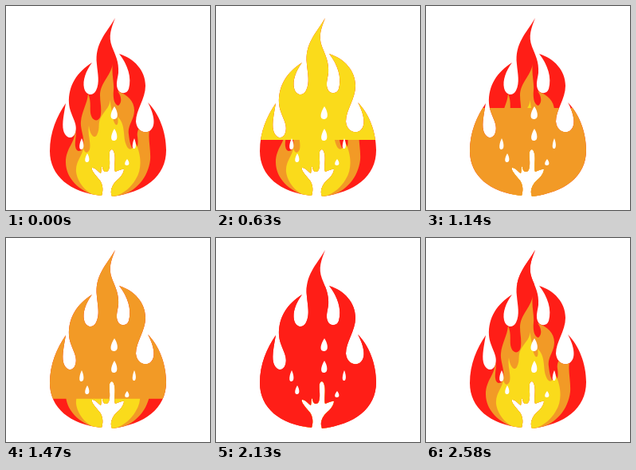
An HTML page that plays this animation: 256x256 px, repeating every 2.67 s.

```html
<!DOCTYPE html>
<html lang="en">
<head>
<meta charset="utf-8">
<title>Flame</title>
<style>
  html, body { margin: 0; width: 100%; height: 100%; overflow: hidden; background: #fff; }
  svg { display: block; width: 100vw; height: 100vh; }
</style>
</head>
<body>
<svg viewBox="0 0 256 256">
  <defs>
    <path id="body" d="M137 15
      C132 28 128 38 133 51 C137 61 142 70 141 84 C140 92 137 99 141 106
      C145 111 152 110 154 104 C158 90 153 74 142 60
      C161 66 175 81 175 100 C175 117 163 130 163 145 C164 155 172 161 180 157
      C189 151 186 136 178 121
      C192 135 201 158 201 181 C201 214 174 234 133 239
      C130 232 133 224 140 218 C145 214 148 208 148 205 C145 204 141 207 137 208
      C135 203 138 192 136 185 C135 180 132 178 130 183 C129 189 132 202 128 207
      C124 210 121 206 121 201 C119 202 120 207 119 210
      C116 208 111 202 108 203 C106 206 114 214 118 219 C122 225 122 232 120 238
      C80 234 55 213 55 182 C55 158 64 138 75 122
      C73 134 70 147 72 156 C75 167 84 168 87 159 C91 147 80 137 79 122
      C78 100 89 83 108 71
      C100 82 96 93 98 103 C100 112 109 114 113 106 C118 96 115 85 114 73
      C111 47 126 34 137 15 Z"/>
    <clipPath id="inside"><use href="#body"/></clipPath>
    <clipPath id="band"><rect id="rect" width="256" height="256"/></clipPath>
  </defs>
  <use href="#body" fill="#ff1e17"/>
  <g clip-path="url(#inside)">
    <path fill="#f29a26" d="M134 73
      C132 84 136 96 135 106 C134 116 136 124 141 125 C146 121 145 113 140 107
      C152 111 161 119 161 131 C161 143 152 150 154 161
      C155 170 157 180 161 180 C166 179 166 171 165 164 C164 158 166 154 169 151
      L181 152 C177 165 182 178 181 193 C178 217 162 234 138 240
      L119 240 C93 234 75 217 75 196 C75 178 87 172 87 155
      C89 163 86 170 87 176 C88 184 95 184 97 176
      C99 165 93 155 94 145 C95 132 102 123 103 110
      C108 122 104 130 107 138 C110 146 118 145 119 136
      C120 126 118 121 118 112 C118 97 131 88 134 73 Z"/>
    <path fill="#fadb1b" d="M131 115
      C130 124 134 134 135 144 C138 153 142 150 140 139
      C150 148 147 162 150 172 C153 182 159 183 162 171
      C170 185 171 205 163 217 C157 228 147 236 134 240
      L121 240 C104 238 90 224 88 208 C87 195 96 188 97 178
      C99 186 103 185 105 180 C107 170 102 162 104 150
      C105 160 110 168 114 162 C119 152 114 148 120 138 C125 130 131 126 131 115 Z"/>
  </g>
  <use id="flood" href="#body" clip-path="url(#band)"/>
  <g id="drops" fill="#fff"></g>
</svg>
<script>
  const LOOP = 2670, STEP = 30, SPEED = 0.5625, LEAD = 28;
  const starts = [12.4, 473.6, 912.4, 1373.6, 1782, 2228];
  const colors = ['#fadb1b', '#f29a26', '#ff1e17'];
  const rect = document.getElementById('rect');
  const flood = document.getElementById('flood');

  // tip x, tip y, half width, height
  const drops = [
    [136, 126, 4, 16], [136, 154, 3.5, 15], [95, 166, 2.5, 14],
    [102, 185, 2.5, 11], [161, 166, 2, 13], [152, 192, 2.5, 8]
  ];
  document.getElementById('drops').innerHTML = drops.map(([x, y, w, h]) =>
    `<path d="M${x} ${y}c${w} ${h * 0.35} ${w * 1.6} ${h} ${-w * 0.2} ${h}` +
    `c${-w * 1.5} 0 ${-w} ${-h * 0.55} ${w * 0.2} ${-h}z"/>`).join('');

  function draw(time) {
    const t = Math.floor((time % LOOP) / STEP) * STEP;
    const phase = Math.max(0, starts.filter(s => t >= s + LEAD).length - 1);
    const rising = phase % 2 === 0;
    const edge = Math.min(256, Math.max(0, 256 - (t - starts[phase]) * SPEED));
    rect.setAttribute('y', rising ? edge : 0);
    rect.setAttribute('height', rising ? 256 - edge : edge);
    flood.setAttribute('fill', colors[phase >> 1]);
  }

  const begin = performance.now();
  function tick() {
    draw(performance.now() - begin);
    requestAnimationFrame(tick);
  }
  tick();
</script>
</body>
</html>
```
